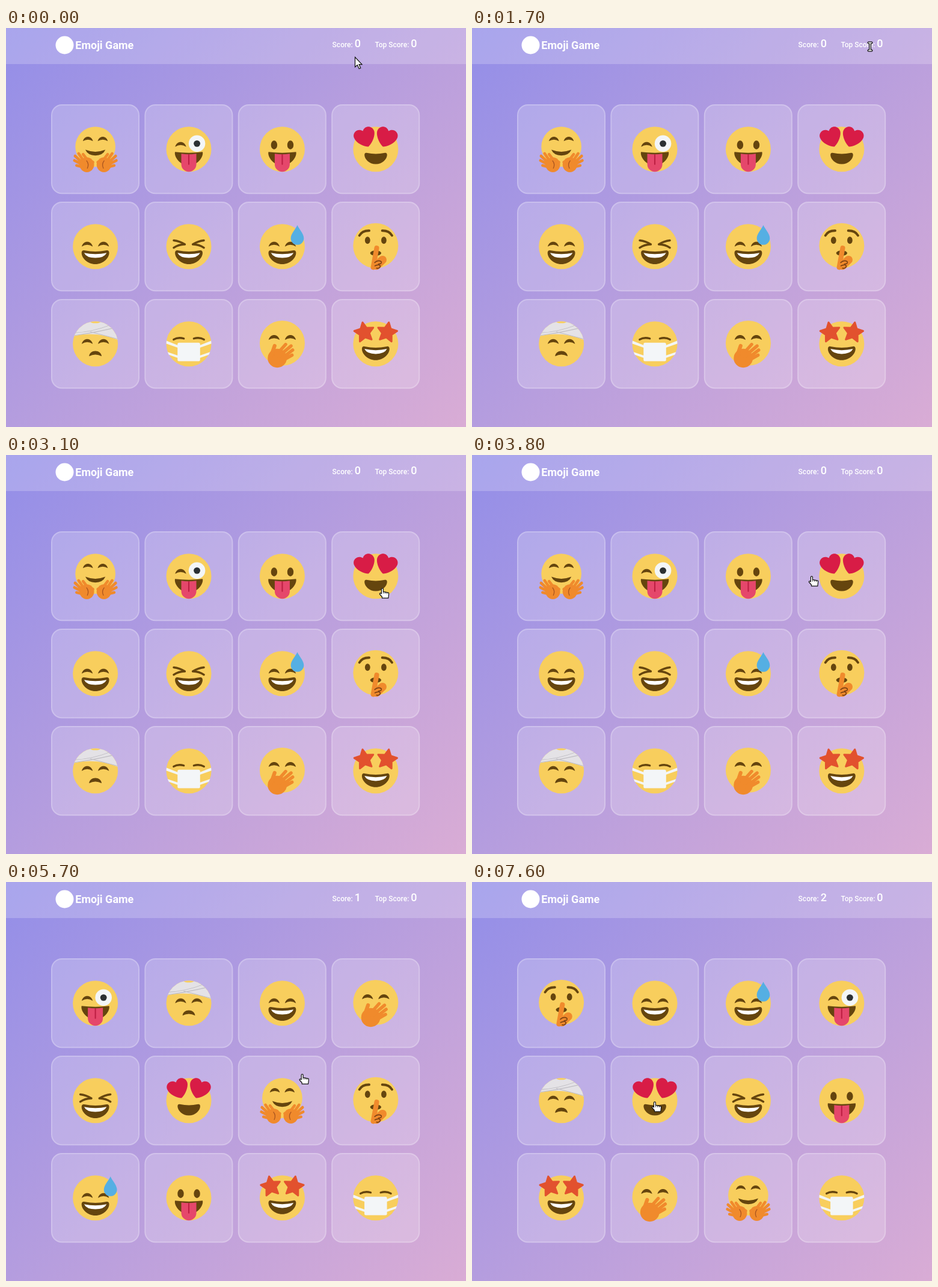
Write an HTML page that moves like this. It is 765 by 664 pixels and loops after 8 s.

```html
<!DOCTYPE html>
<html lang="en">
<head>
<meta charset="utf-8">
<title>Emoji Game</title>
<style>
  html, body { margin: 0; width: 100%; height: 100%; overflow: hidden; }
  body { background: linear-gradient(135deg, #938ee8, #b79ede 50%, #d9acd5); }
  svg { display: block; width: 100%; height: 100%; }
  text { font-family: Roboto, Arial, sans-serif; fill: #fff; }
  .label { font-size: 12px; font-weight: 500; }
  .num { font-size: 18px; }
</style>
</head>
<body>
<svg viewBox="0 0 765 664">
  <defs id="defs"></defs>
  <rect width="765" height="60" fill="#fff" fill-opacity=".2"/>
  <circle cx="97.5" cy="28.5" r="15" fill="#fff"/>
  <text x="115.3" y="35" font-size="18" font-weight="700">Emoji Game</text>
  <text class="label" x="542.6" y="32">Score: <tspan class="num" id="score">0</tspan></text>
  <text class="label" x="613.6" y="32">Top Score: <tspan class="num">0</tspan></text>
  <g id="cards"></g>
  <use id="cursor"/>
</svg>
<script>
const LOOP = 8000, STEP = 100;
const YELLOW = '#f8ce5d', BROWN = '#65450e', ORANGE = '#f08a2c', RED = '#d81c46',
      PINK = '#e5476b', WHITE = '#f3f6f8', STAR = '#e2512e', CLOTH = '#e4e2e6', SEAM = '#bfbdc3';
const $ = id => document.getElementById(id);

// Drawing helpers; every emoji lives in a 36-unit box
const fill = (d, color) => `<path d="${d}" fill="${color}"/>`;
const line = (d, color, w) =>
  `<path d="${d}" fill="none" stroke="${color}" stroke-width="${w}" stroke-linecap="round" stroke-linejoin="round"/>`;
const oval = (x, y, rx, ry, color) => `<ellipse cx="${x}" cy="${y}" rx="${rx}" ry="${ry}" fill="${color}"/>`;
const lift = (dy, s) => `<g transform="translate(0 ${-dy})">${s}</g>`;
const mirror = s => s + `<g transform="translate(36 0) scale(-1 1)">${s}</g>`;
const face = (cy = 18, r = 18) => oval(18, cy, r, r, YELLOW);

// Five-pointed star with rounded tips
function star(cx, cy, r, turn) {
  const points = Array.from({ length: 10 }, (_, i) => {
    const a = (turn + i * 36) * Math.PI / 180, k = i % 2 ? r / 2 : r;
    return `${cx + k * Math.sin(a)} ${cy - k * Math.cos(a)}`;
  });
  const d = `M${points.join('L')}z`;
  return fill(d, STAR) + line(d, STAR, 1.4);
}

// Shared features
const arc = fill('M7.1 18C8.5 12.9 14.5 12.9 15.9 18Q11.5 15.2 7.1 18z', BROWN);
const arcs = mirror(arc);
const dots = (y, rx, ry) => mirror(oval(11.5, y, rx, ry, BROWN));
const mouth = fill('M18 22Q14 22 9 21C8 20.8 7 21.3 7 23C7 27 11.6 32 18 32S29 27 29 23C29 21.3 28 20.8 27 21Q22 22 18 22z', BROWN);
const grin = mouth + fill('M9 23Q18 25 27 23Q25 27 18 27T9 23z', '#fff');
const lick = fill('M7 20.2Q18 21.6 29 20.2C30 24 25 31 18 31S6 24 7 20.2z', BROWN)
  + fill('M12 21.6Q18 22.6 24 21.6V30A6 6 0 0 1 12 30z', PINK) + line('M18 22.5V30', '#bd1f43', 1);
const heart = fill('M16.7 3.3C14.8-1.4 8.8-.7 7.8 3.5C3.8.8-.9 4.7.7 8.9C2.5 13.3 8.6 16 12.2 16C14.8 13.8 18 7.2 16.7 3.3z', RED);
const hugHand = line('M9.5 28.5L4.6 21.4M9 30L1.8 23.4M9 31L1.3 27M9.5 32.5L3 31M12 27L8.2 22', ORANGE, 2.2)
  + oval(11.2, 30.4, 5.8, 5.9, ORANGE) + line('M13 33L15.7 28.4', ORANGE, 2.8)
  + line('M11 27.2Q13.2 30 11.6 33.2', '#a85420', .6);

const emojis = {
  hug: face(16, 16) + `<g transform="translate(1.6 -4.8) scale(.91)">${arcs}</g>`
    + fill('M10 18.4Q18 21.6 26 18.4Q24 23 18 23T10 18.4z', BROWN) + mirror(hugHand),
  wink: face() + lift(1.9, arc) + oval(24.5, 13.5, 6.6, 6.6, WHITE) + oval(24.5, 13.5, 2.6, 2.6, '#2b3033') + lick,
  tongue: face() + dots(14.6, 2.5, 3.5) + lick,
  heart: face() + `<g transform="translate(3.3 3.7) scale(.82)">${mouth}</g>` + mirror(heart),
  smile: face() + arcs + grin,
  laugh: face() + mirror(line('M6 13.1Q10.5 13.6 14.8 16.2Q9.8 16.3 6 18.9', BROWN, 1.7)) + grin,
  sweat: face() + arcs + grin
    + fill('M30 .9C31.5 4.3 35.2 7.8 35.2 11.4A5.2 5.2 0 0 1 24.8 11.4C24.8 7.8 28.6 4.3 30 .9z', '#55afe3'),
  shush: face(17.3) + mirror(line('M5 9.2Q7.2 5.2 12.8 5.3', BROWN, 1.9)) + dots(13, 2.1, 2.9)
    + oval(18, 23.2, 4.4, 2.1, BROWN) + line('M18.8 19.2L16 34.6', ORANGE, 3.9)
    + line('M18.5 33.2L23.4 28.6', ORANGE, 6.6)
    + line('M17.2 30.8Q19.8 28.4 22.4 30Q23.4 31.8 20.2 31.9M17.4 33.4Q20.8 31.7 21.7 33.5Q21.2 35.8 18.7 35.2', '#7d4214', .8),
  band: face() + '<g clip-path="url(#head)">' + fill('M0 11.9Q18 7.5 36 14.8V0H0z', CLOTH)
    + line('M1 9.2Q15 8.6 29 3.2M1 11.3Q14 9.6 31.5 5.6M14 8.3L36 14.2', SEAM, .5)
    + oval(18, 0, 4.2, 1.5, YELLOW) + '</g>' + arcs + fill('M13 27.8C13.4 22.2 22.6 22.2 23 27.8Q18 25.2 13 27.8z', BROWN),
  mask: face() + mirror(line('M5.9 14.5Q9.5 12.4 14 13.7', BROWN, 1.6)
    + fill('M.2 15.5L9.5 19.2V21.1L0 17.8zM1.1 24.5L9.5 27.4V29.3L2 26.7z', WHITE))
    + `<rect x="9" y="17" width="18" height="14.8" rx="1.2" fill="${WHITE}"/>`,
  giggle: face(17.4) + lift(3.2, arcs) + oval(14, 29.4, 7.6, 7.5, ORANGE)
    + line('M9 28L11.9 19.6', ORANGE, 3) + line('M13 27L20.7 18.4M15 28L25 19.6M17 30L26.3 22.9M17 32L25.8 26.9', ORANGE, 2.6),
  star: face() + lift(1, grin) + mirror(star(8.9, 8.8, 8.1, -10))
};

const beam = 'M-2.5-6.5H2.5M0-6.5V6.5M-2.5 6.5H2.5';
const cursors = {
  arrow: '<path d="M.5.5V17L4.3 13.5 7.2 19.8 9.8 18.6 7 12.6H12z" fill="#fff" stroke="#111" stroke-width="1.2"/>',
  caret: line(beam, '#111', 4) + line(beam, '#fff', 1.4),
  hand: lift(-.7, '<path d="M-1.6 1.5C-1.6-.3 1.4-.3 1.4 1.5V5.6L10.5 7.6V11L9.8 16.4H-.6V14.3L-4.6 9.8C-4.9 7.9-3.3 7.6-1.6 9.2z" fill="#fff" stroke="#111" stroke-width="1.2" stroke-linejoin="round"/>'
    + line('M1.4 6V8.6M4.4 6.6V8.9M7.4 7.3V9.2', '#111', .8))
};

// Rounds of the game; the score is the round's index
const rounds = [
  [0, 'hug wink tongue heart smile laugh sweat shush band mask giggle star'],
  [4800, 'wink band smile giggle laugh heart hug shush sweat tongue star mask'],
  [6500, 'shush smile sweat wink band heart laugh tongue star giggle hug mask']
].map(([at, names]) => ({ at, names: names.split(' ') }));

// Pointer legs: first step, last step, destination
const start = [580, 48];
const legs = [
  [100, 500, 567, 32], [1000, 1100, 577, 31], [1300, 1700, 662, 31],
  [2100, 2300, 572, 106], [2500, 3100, 626, 221], [3400, 3800, 565, 201],
  [3900, 4500, 615, 220], [5200, 5900, 452, 352], [6900, 7600, 304, 365]
];

const CARD_W = 147, CARD_H = 149.3;
const cards = Array.from({ length: 12 }, (_, i) => ({ x: 75 + 155.4 * (i % 4), y: 127 + 162 * Math.floor(i / 4) }));

function pointer(t) {
  let [x, y] = start;
  for (const [from, to, nx, ny] of legs) {
    if (t < from) break;
    const k = Math.min(1, (t - from + STEP) / (to - from + STEP));
    x += (nx - x) * k;
    y += (ny - y) * k;
  }
  return [x, y];
}

function cursorAt(x, y) {
  const onLabel = y > 14 && y < 38 && (Math.abs(x - 566) < 24 || Math.abs(x - 649) < 36);
  if (onLabel) return 'caret';
  const onCard = cards.some(c => x > c.x && x < c.x + CARD_W && y > c.y && y < c.y + CARD_H);
  return onCard ? 'hand' : 'arrow';
}

$('defs').innerHTML = '<clipPath id="head"><circle cx="18" cy="18" r="18"/></clipPath>'
  + Object.entries({ ...emojis, ...cursors }).map(([id, s]) => `<g id="${id}">${s}</g>`).join('');

$('cards').innerHTML = cards.map(({ x, y }) =>
  `<rect x="${x}" y="${y}" width="${CARD_W}" height="${CARD_H}" rx="18" fill="#fff" fill-opacity=".2"/>
   <rect x="${x + 1}" y="${y + 1}" width="${CARD_W - 2}" height="${CARD_H - 2}" rx="17" fill="none" stroke="#fff" stroke-opacity=".22" stroke-width="2"/>
   <use class="emoji" transform="translate(${x + 36.1} ${y + 37.2}) scale(2.085)"/>`).join('');
const slots = [...document.querySelectorAll('.emoji')];

let shown;
function draw(time) {
  const t = Math.floor(time % LOOP / STEP) * STEP;
  const score = rounds.filter(r => r.at <= t).length - 1;
  if (score !== shown) {
    shown = score;
    $('score').textContent = score;
    slots.forEach((slot, i) => slot.setAttribute('href', '#' + rounds[score].names[i]));
  }
  const [x, y] = pointer(t);
  $('cursor').setAttribute('href', '#' + cursorAt(x, y));
  $('cursor').setAttribute('transform', `translate(${x} ${y})`);
}

function tick() {
  draw(performance.now());
  requestAnimationFrame(tick);
}
tick();
</script>
</body>
</html>
```
